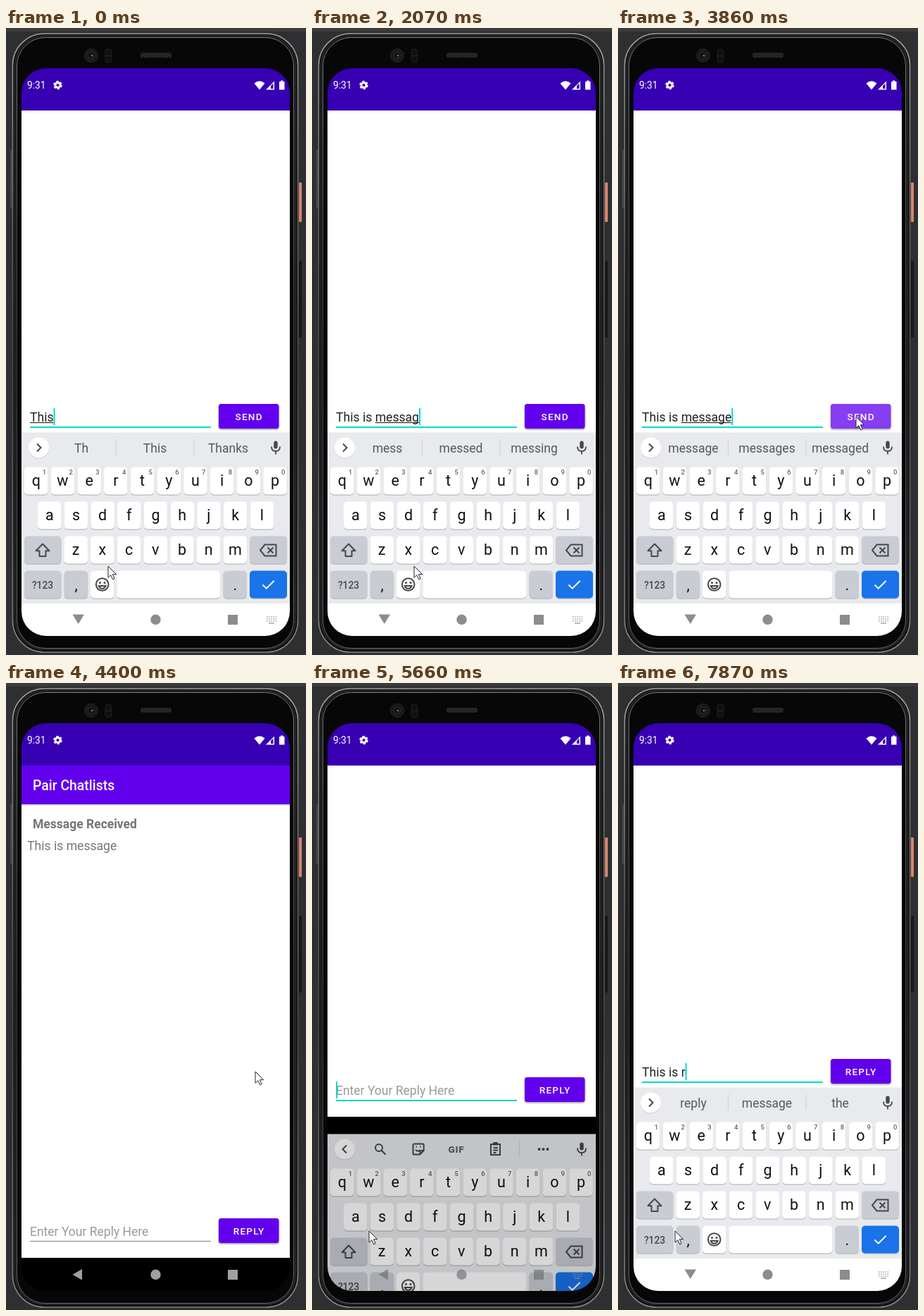
An HTML page that plays this animation: 426 by 889 pixels, repeating every 7.99 s.

```html
<!DOCTYPE html>
<html lang="en">
<head>
<meta charset="utf-8">
<title>Messaging demo</title>
<style>
  html, body { margin: 0; width: 100%; height: 100%; overflow: hidden; background: #2e2f31; }
  svg { display: block; width: 100vw; height: 100vh; font-family: Roboto, "Open Sans", sans-serif; }
  text { white-space: pre; }
  .mid { text-anchor: middle; }
  .med { font-weight: 500; }
  .key { font-size: 21.5px; fill: #111; text-anchor: middle; }
  .num { font-size: 9.5px; font-weight: 500; fill: #5f6368; text-anchor: middle; }
  .word { font-size: 17.5px; fill: #55585d; text-anchor: middle; }
  .line { fill: none; stroke: #45484c; stroke-width: 2; }
</style>
</head>
<body>
<svg viewBox="0 0 426 889" preserveAspectRatio="none">
  <defs>
    <clipPath id="screenClip"><rect x="22" y="57" width="381" height="805" rx="35"/></clipPath>
    <clipPath id="appClip"><rect x="22" y="117" width="381" height="699"/></clipPath>
    <linearGradient id="rim" x1="0" y1="0" x2="0" y2="1">
      <stop offset="0" stop-color="#a0a0a0"/>
      <stop offset=".3" stop-color="#666"/>
      <stop offset=".55" stop-color="#4b4b4c"/>
      <stop offset="1" stop-color="#858586"/>
    </linearGradient>
    <pattern id="grille" width="4" height="4" patternUnits="userSpaceOnUse">
      <rect width="4" height="4" fill="#171717"/>
      <circle cx="1" cy="1" r="1" fill="#3a3a3a"/><circle cx="3" cy="3" r="1" fill="#3a3a3a"/>
    </pattern>
    <filter id="drop" x="-10%" y="-20%" width="120%" height="160%">
      <feDropShadow dx="0" dy="1.4" stdDeviation="1.1" flood-opacity=".4"/>
    </filter>
  </defs>

  <g id="phone">
    <rect width="426" height="889" fill="#2e2f31"/>
    <rect width="426" height="5" fill="#3c3c3d"/>
    <rect x="6" y="172" width="3" height="84" rx="1" fill="#464749"/>
    <rect x="416" y="219" width="4" height="56" rx="1" fill="#d8866d"/>
    <rect x="416" y="330" width="4" height="109" rx="1" fill="#17181a"/>
    <rect x="9.5" y="8" width="405" height="877" rx="45" fill="#08080a" stroke="url(#rim)" stroke-width="1.6"/>
    <rect x="13" y="11" width="398" height="870" rx="42" fill="none" stroke="#232324" stroke-width="3"/>
    <rect x="15.5" y="13.5" width="393" height="866" rx="40" fill="#070708" stroke="url(#rim)" stroke-width=".8"/>
    <circle cx="121" cy="39" r="9.5" fill="#19191a" stroke="#262627"/>
    <circle cx="121" cy="39" r="4.5" fill="#0b0c0d" stroke="#343537"/>
    <circle cx="122" cy="39" r="1.6" fill="#66696c"/>
    <rect x="141" y="30" width="9" height="19" rx="4" fill="#101011" stroke="#202021"/>
    <path d="M141 39.500h9" stroke="#262627"/>
    <rect x="191" y="35" width="44" height="7" rx="3" fill="url(#grille)"/>
  </g>

  <g clip-path="url(#screenClip)">
    <rect x="22" y="57" width="381" height="805" fill="#000"/>
    <rect id="backing" x="22" y="117" width="381" height="699" fill="#fff"/>
    <g clip-path="url(#appClip)">
      <g id="app">
        <rect x="22" y="117" width="381" height="698" fill="#fff"/>
        <rect x="22" y="172" width="381" height="2" fill="#dcdcdc"/>
        <rect x="22" y="117" width="381" height="55" fill="#6200ee"/>
        <text class="med" x="38" y="152" font-size="19.4" fill="#fff">Pair Chatlists</text>
        <text x="38" y="206" font-size="17.5" font-weight="700" fill="#757575">Message Received</text>
        <text x="30" y="237" font-size="17.6" fill="#757575">This is message</text>
        <text id="hint" x="34" y="784" font-size="17.5" fill="#9a9a9a">Enter Your Reply Here</text>
        <text id="typed" x="34" y="784" font-size="17.6" fill="#212121"></text>
        <rect id="compose" y="785" height="1.1" fill="#212121"/>
        <rect id="field" x="34" width="257"/>
        <rect id="caret" y="765" width="2" height="24" fill="#03dac5"/>
        <rect id="button" x="302" y="759" width="85.500" height="35" rx="3.500" filter="url(#drop)"/>
        <text id="label" class="med" y="781.700" font-size="13.600" letter-spacing="1.21" fill="#fff"></text>
      </g>
    </g>
    <rect x="22" y="57" width="381" height="60" fill="#3700b3"/>
    <g id="status" fill="#fff">
      <text x="30" y="86" font-size="13.800">9:31</text>
      <circle cx="73.500" cy="81" r="3.500" fill="none" stroke="#fff" stroke-width="2.800"/>
      <circle cx="73.500" cy="81" r="5.400" fill="none" stroke="#fff" stroke-width="1.800" stroke-dasharray="3.200 2.455"/>
      <path d="M352.500 78.500Q360 72 367.500 78.500L360 87.500Z"/>
      <path d="M369 87.500L381 75.500V87.500Z"/>
      <path d="M376 86V82L379.500 78.800V86Z" fill="#3700b3"/>
      <path d="M388 76h2v-1.500h3.500v1.500h2v11.500h-7.500z"/>
    </g>
    <g id="keyboard"></g>
    <g id="nav">
      <path id="down" d="M94.500 831.500h16.500l-8.200 13.500z"/>
      <path id="back" d="M108 831v15.500l-13.500 -7.700z"/>
      <circle cx="212.500" cy="838.800" r="7.200"/>
      <rect x="315" y="832" width="14" height="14"/>
      <g id="switcher">
        <path d="M370 835h14M370 838h14M370 841h14" stroke="#a6a6a6" stroke-width="1.600" stroke-dasharray="1.600 1.500"/>
        <path d="M373 844h8" stroke="#a6a6a6" stroke-width="1.400"/>
      </g>
    </g>
  </g>
  <path id="mouse" d="M0 0V16.200L3.800 12.700L6.600 18.800L9.100 17.700L6.400 11.700H11.600Z" fill="#fff" stroke="#222" stroke-width="1"/>
</svg>

<script>
const $ = id => document.getElementById(id);
const LOOP = 7990, PAN = 226;

// Keyboard
const keyBox = (x, y, w, fill = '#fff') =>
  `<rect x="${x}" y="${y + 1.2}" width="${w}" height="39" rx="5" fill="#b8babf"/>` +
  `<rect x="${x}" y="${y}" width="${w}" height="39" rx="5" fill="${fill}"/>`;
const letter = (ch, x, y) => `<text class="key" x="${x}" y="${y}">${ch}</text>`;
const PITCH = 37.7, KEY = 33.5, GREY = '#c9ccd3';

function row(chars, x, y, numbered) {
  return [...chars].map((ch, i) => {
    const left = x + i * PITCH;
    const num = numbered ? `<text class="num" x="${left + 28.5}" y="${y + 10.5}">${(i + 1) % 10}</text>` : '';
    return keyBox(left, y, KEY, '#fff') + letter(ch, left + KEY / 2, y + 26.5) + num;
  }).join('');
}

const dividers = xs => xs.map(x => `<rect x="${x}" y="583" width="1" height="23" fill="#cdd0d4"/>`).join('');

$('keyboard').innerHTML = `
  <rect x="22" y="573.5" width="381" height="243" fill="#e8eaed"/>
  <rect x="22" y="816" width="381" height="46" fill="#fff"/>
  <circle cx="46.500" cy="596" r="14.500" fill="#c9cbcf"/>
  <circle cx="46.500" cy="595" r="14.500" fill="#fff"/>
  <path id="chevron" class="line"/>
  <g fill="#45484c"><rect x="380.300" y="585.500" width="5.400" height="11" rx="2.700"/>
    <path d="M377 593.500q0 6.500 6 6.500t6 -6.500M383 600v4.500" fill="none" stroke="#45484c" stroke-width="1.800"/></g>
  <g id="words">${dividers([156, 266.5])}
    ${[107, 211.5, 315.5].map(x => `<text class="word" x="${x}" y="602"></text>`).join('')}</g>
  <g id="tools">${dividers([294])}
    <circle class="line" cx="95" cy="593" r="5"/><path class="line" d="M98.500 596.500l6 6"/>
    <path class="line" stroke-width="1.800" d="M145 587.500h12.500q1.200 0 1.200 1.200v8.300l-5.500 5.500h-8.200q-1.500 0 -1.500 -1.500v-12q0 -1.500 1.500 -1.500zM153.500 602v-5h5M147 595.500q3 4 6 1M147.500 591.500h1.500M153 591.500h1.500"/>
    <text x="205" y="599.500" font-size="13.500" font-weight="900" class="mid" letter-spacing=".8" fill="#5f6368">GIF</text>
    <path class="line" d="M254 588h13v15h-13z"/><path class="line" d="M257.500 593h6.500M257.500 596.500h6.500M257.500 600h4" stroke-width="1.300"/>
    <rect x="257" y="585" width="7" height="4.500" rx="1" fill="#45484c"/>
    <path d="M322.500 595h.01M328.500 595h.01M334.500 595h.01" stroke="#45484c" stroke-width="4" stroke-linecap="round"/></g>
  ${row('qwertyuiop', 26, 622.5, true)}
  ${row('asdfghjkl', 45, 671.5)}
  ${row('zxcvbnm', 82.4, 720.5)}
  ${keyBox(26, 720.5, 52.5, GREY)}${keyBox(346, 720.5, 53, GREY)}
  ${keyBox(26, 769.5, 52.5, GREY)}${keyBox(82.7, 769.5, KEY, GREY)}${keyBox(120, 769.5, KEY)}
  ${keyBox(157.3, 769.5, 147)}${keyBox(308.5, 769.5, KEY, GREY)}${keyBox(346, 769.5, 53, '#1a73e8')}
  <path class="line" d="M52 731.500l9.500 9.800h-5v7.700h-9v-7.700h-5z" stroke-linejoin="round"/>
  <path class="line" d="M367.500 732.500h16v16h-16l-6.500 -8zM371.500 736.500l8 8M379.500 736.500l-8 8"/>
  <text class="mid med" x="52" y="794.500" font-size="13.800" fill="#45484c">?123</text>
  ${letter(',', 99.5, 797)}${letter('.', 325.3, 797)}
  <circle class="line" cx="136.700" cy="789" r="8.800"/>
  <path class="line" d="M131.800 791q1.600 3.800 4.900 3.800t4.900 -3.800z" stroke-width="1"/>
  <circle cx="133.500" cy="786.500" r="1.500" fill="#45484c"/><circle cx="140" cy="786.500" r="1.500" fill="#45484c"/>
  <path d="M364.500 789.500l5.200 5.200l11 -11" fill="none" stroke="#fff" stroke-width="2"/>`;

// Typing: time, text, start of composing underline (-1 for none), suggestions
const NEXT = 'reply message the', MESS = 'mess messed messing', DONE = 'message messages messaged';
const typing = [
  [0, 'This', 0, 'Th This Thanks'],
  [150, 'This ', -1, 'is was message'],
  [320, 'This i', 5, 'is was message'],
  [500, 'This is', 5, 'I is in'],
  [670, 'This is', 5, 'id is it'],
  [950, 'This is', -1, NEXT],
  [1230, 'This is ', -1, NEXT],
  [1370, 'This is m', 8, NEXT],
  [1510, 'This is me', 8, 'my me message'],
  [1650, 'This is mes', 8, 'me message men'],
  [1790, 'This is mess', 8, 'mes message mess'],
  [1930, 'This is messa', 8, MESS],
  [2070, 'This is messag', 8, MESS],
  [2190, 'This is messag', 8, 'messag message messaged'],
  [2340, 'This is message', 8, 'messag message messaged'],
  [2480, 'This is message', 8, DONE],
  [4130, '', -1, ''],
  [6360, 'T', -1, ''],
  [6640, 'T', 0, 'T The This'],
  [6800, 'Th', 0, 'T The This'],
  [6950, 'Thi', 0, 'Th The This'],
  [7110, 'This', 0, 'Thi This Thing'],
  [7260, 'This ', -1, 'is was message'],
  [7420, 'This i', 5, 'is was message'],
  [7570, 'This is', 5, 'id is it'],
  [7720, 'This is ', -1, NEXT],
  [7870, 'This is r', -1, NEXT]
];

// Pointer: time, x, y
const pointer = [
  [0, 145, 763], [2610, 158, 748], [2750, 184, 722], [2880, 226, 682], [3020, 268, 640],
  [3300, 318, 582], [3440, 338, 551], [4400, 354, 551], [4940, 336, 584], [5060, 276, 652],
  [5190, 182, 728], [5310, 102, 770], [5430, 81, 777]
];

// Window: time, pan, app opacity, keyboard offset, keyboard opacity
const layout = [
  [0, PAN, 1, 0, 1], [4130, -24, .7, 110, .45], [4280, 0, 1, 300, 0],
  [5560, 96, 1, 172, .45], [5660, 200, 1, 66, .84], [5810, PAN, 1, 0, 1]
];

// Button: time, fill
const ripple = [[0, '#6200ee'], [3720, '#7928f0'], [3860, '#873cf2'], [4130, '#6200ee']];

const at = (steps, t) => steps.findLast(s => s[0] <= t);
const set = (id, attrs) => { for (const k in attrs) $(id).setAttribute(k, attrs[k]); };
const show = (id, on) => $(id).style.display = on ? '' : 'none';

const pen = document.createElement('canvas').getContext('2d');
function widthOf(text) {
  pen.font = '17.6px Roboto, "Open Sans", sans-serif';
  return pen.measureText(text).width;
}

function drawInput(t) {
  const [, text, from, words] = at(typing, t);
  const reply = t >= 4130;
  const focused = !reply || t >= 5430;
  const end = 34 + widthOf(text);
  $('typed').textContent = text;
  show('hint', !text);
  show('compose', from >= 0);
  if (from >= 0) {
    const x = 34 + widthOf(text.slice(0, from));
    set('compose', { x, width: end - x });
  }
  show('caret', focused && !(t >= 6080 && t < 6360));
  set('caret', { x: end });
  set('field', focused ? { y: 791, height: 2, fill: '#03dac5' } : { y: 791, height: 1, fill: '#808080' });
  set('button', { fill: at(ripple, t)[1] });
  set('label', { x: reply ? 322.7 : 325.5 });
  $('label').textContent = reply ? 'REPLY' : 'SEND';

  show('words', words);
  show('tools', !words);
  set('chevron', { d: words ? 'M44 589.500l5.500 5.500l-5.500 5.500' : 'M49 589.500l-5.500 5.500l5.500 5.500' });
  const list = words.split(' ');
  $('words').querySelectorAll('text').forEach((el, i) => el.textContent = list[i] || '');
}

function drawWindow(t) {
  const [, pan, alpha, drop, solid] = at(layout, t);
  const open = drop === 0;
  set('app', { transform: `translate(0 ${-pan})`, opacity: alpha });
  set('keyboard', { transform: `translate(0 ${drop})`, opacity: solid });
  show('backing', t < 4280);
  show('down', open);
  show('back', !open);
  show('switcher', solid > 0);
  set('nav', { fill: open ? '#8c8c8c' : '#a0a0a0', opacity: solid > 0 && !open ? .6 : 1 });
  set('nav', { fill: solid > 0 && !open ? '#66686c' : open ? '#8c8c8c' : '#a0a0a0' });
}

function frame(now) {
  const t = (now - start) % LOOP;
  drawInput(t);
  drawWindow(t);
  const [, x, y] = at(pointer, t);
  set('mouse', { transform: `translate(${x} ${y})` });
  requestAnimationFrame(frame);
}

const start = performance.now();
frame(start);
</script>
</body>
</html>
```
